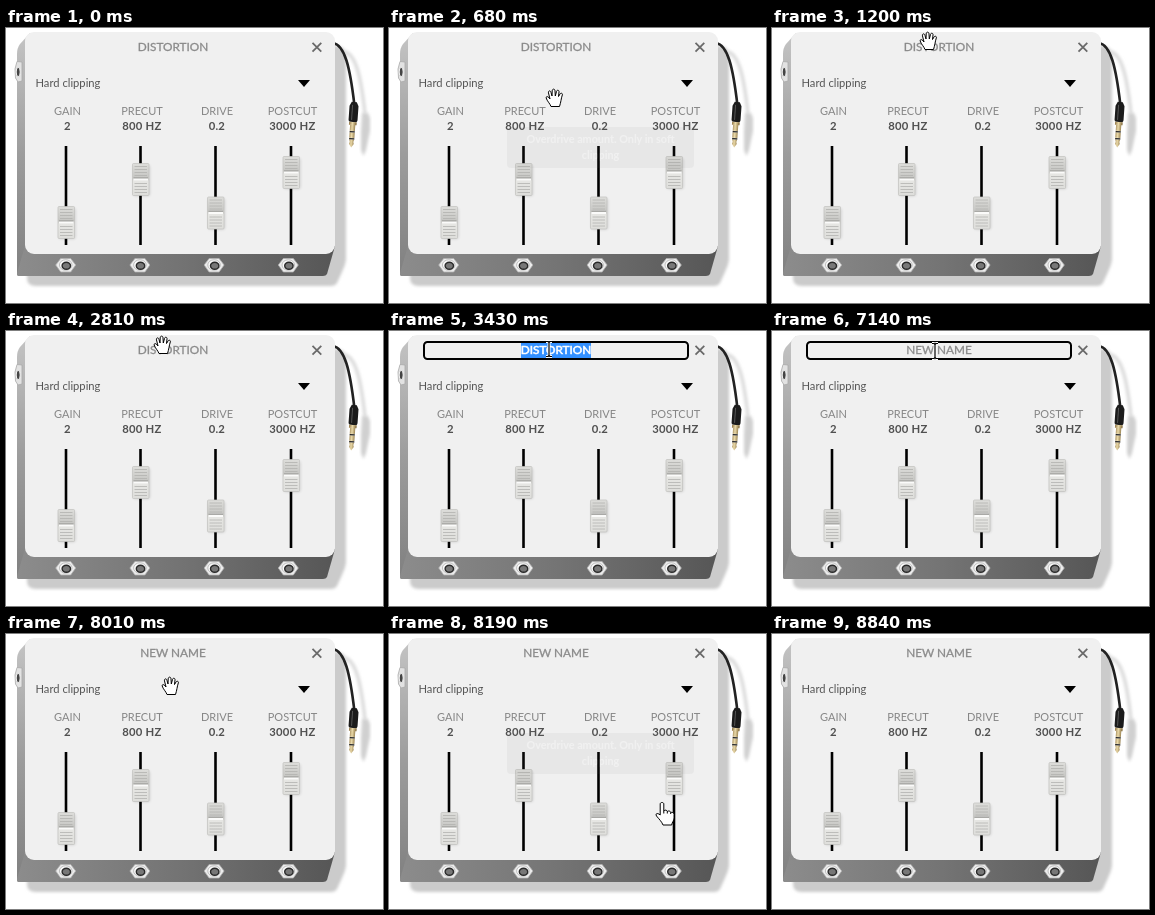
An HTML page that plays this animation: 377x275 px, repeating every 9.31 s.

```html
<!DOCTYPE html>
<html lang="en">
<head>
<meta charset="utf-8">
<title>Distortion pedal</title>
<style>
html, body { margin: 0; width: 100%; height: 100%; overflow: hidden; background: #fff; }
svg { display: block; width: 377px; height: 275px; }
text { font-family: Lato, "Open Sans", sans-serif; text-anchor: middle; white-space: pre; }
.label { font-size: 11px; fill: #868686; }
.value { font-size: 11.3px; font-weight: 700; letter-spacing: .25px; fill: #505050; }
.title { font-size: 11.8px; fill: #8a8a8a; stroke: #8a8a8a; stroke-width: .3; }
.selected { fill: #fff; stroke: #fff; stroke-width: .6; }
.mode { font-size: 11.2px; fill: #555; text-anchor: start; }
.tip text { font-size: 10.8px; font-weight: 700; fill: #fff; }
.cursor { fill: #fff; stroke: #000; stroke-linejoin: round; }
</style>
</head>
<body>
<svg id="stage" viewBox="0 0 377 275">
  <defs>
    <linearGradient id="left" x2="0" y2="1">
      <stop offset="0" stop-color="#c4c4c4"/><stop offset=".5" stop-color="#9c9c9c"/><stop offset="1" stop-color="#808080"/>
    </linearGradient>
    <linearGradient id="front">
      <stop offset="0" stop-color="#8c8c8c"/><stop offset=".5" stop-color="#747474"/><stop offset="1" stop-color="#565656"/>
    </linearGradient>
    <linearGradient id="thumbFill" x2="0" y2="1">
      <stop offset="0" stop-color="#dededb"/><stop offset=".45" stop-color="#c6c6c3"/>
      <stop offset=".55" stop-color="#e6e6e3"/><stop offset="1" stop-color="#dededb"/>
    </linearGradient>
    <linearGradient id="gold">
      <stop offset="0" stop-color="#8f7443"/><stop offset=".45" stop-color="#ead9a8"/><stop offset="1" stop-color="#7d6434"/>
    </linearGradient>
    <filter id="soft" x="-20%" y="-20%" width="140%" height="140%"><feGaussianBlur stdDeviation="1.6"/></filter>
    <g id="thumb">
      <rect x="-7" y="-14" width="16.5" height="31" rx="2" fill="#000" opacity=".14" filter="url(#soft)"/>
      <rect x="-8" y="-15.5" width="16.5" height="32" rx="1" fill="url(#thumbFill)" stroke="#c2c2bf" stroke-width=".7"/>
      <path d="M-6-12.5H6.5M-6-9.5H6.5M-6-6.5H6.5M-6-3.5H6.5M-6 4.5H6.5M-6 7.5H6.5M-6 10.5H6.5M-6 13.5H6.5" stroke="#b3b3b0" stroke-width=".8"/>
      <path d="M-7 .5H7.5" stroke="#fbfbfa" stroke-width="2"/>
      <path d="M-7-1.2H7.5" stroke="#a2a29f"/>
    </g>
    <g id="socket">
      <path d="M-10 0L-5-6.5H5L10 0L5 7H-5Z" fill="#ececec" stroke="#b0b0b0" stroke-width=".8"/>
      <ellipse rx="6.3" ry="5.2" fill="#fafafa" stroke="#aaa" stroke-width=".7"/>
      <ellipse cx=".6" cy=".7" rx="4.2" ry="3.5" fill="#777" stroke="#2a2a2a" stroke-width="1.4"/>
    </g>
    <g id="plug">
      <path d="M-2.5 74H2.5L4.5 78V92Q4.5 94 2.5 94H-2.5Q-4.5 94-4.5 92V78Z" fill="#1b1b1b"/>
      <path d="M-1.5 77V92" stroke="#555"/>
      <path d="M-3.8 94H3.8V97H-3.8ZM-2.6 97H2.6V103H-2.6ZM-2.6 104.5H2.6V110H-2.6ZM-2.6 111.5H2.6L1.8 114L2.4 116L0 119.5L-2.4 116L-1.8 114Z" fill="url(#gold)"/>
      <path d="M-2.6 103.8H2.6M-2.6 110.8H2.6" stroke="#222" stroke-width="1.3"/>
    </g>
  </defs>

  <rect width="377" height="275" fill="#fff"/>
  <path d="M34 18H330Q340 18 340 28V232Q339 238 336 244L331 255Q329 258 325 258H30Q21 258 21 250V30Z" fill="#cbcbcb" filter="url(#soft)"/>
  <path d="M339 24C350 27 355 49 359 86" fill="none" stroke="#dcdcdc" stroke-width="3.5" filter="url(#soft)"/>
  <path d="M356 85H362L364 90V103L360 122L357.5 128L355 122L355 103Z" fill="#d0d0d0" filter="url(#soft)"/>
  <path d="M327 15C339 17 344 40 348.3 76" fill="none" stroke="#222" stroke-width="2.6"/>
  <use href="#plug" transform="translate(348.3 0) rotate(4 0 74)"/>

  <path d="M24 5L14 16Q11 20 11 26V246Q11 248 13 248L28 224V5Z" fill="url(#left)"/>
  <path d="M19 218L11 245V246Q11 248 13 248H317Q320 248 321 246L329 218Z" fill="url(#front)"/>
  <path d="M16 34L11 33.5L9 41L9.5 50L12 54L16 53Z" fill="#e2e2e2" stroke="#aaa" stroke-width=".8"/>
  <ellipse cx="12.2" cy="44" rx="2" ry="4.6" fill="#444" stroke="#f5f5f5"/>
  <rect x="19" y="4" width="310" height="222" rx="9" fill="#f0f0f0"/>

  <path d="M306.5 14.8L315.3 23.6M315.3 14.8L306.5 23.6" stroke="#6a6a6a" stroke-width="1.8"/>
  <text class="mode" x="29.5" y="59">Hard clipping</text>
  <path d="M292 52H304L298 59Z"/>
  <g id="controls"></g>

  <g id="editor">
    <rect x="35" y="11" width="264" height="17" rx="3.5" fill="#f0f0f0" stroke="#000" stroke-width="2"/>
    <rect id="selection" x="132" y="12" width="70" height="15" fill="#3390ff"/>
  </g>
  <text id="title" class="title" x="167" y="23"></text>
  <g id="tip" class="tip">
    <rect x="118" y="99" width="187" height="41" rx="4" fill="#777"/>
    <text x="211.5" y="115">Overdrive amount. Only in soft</text>
    <text x="211.5" y="131">clipping</text>
  </g>

  <g id="cursor" class="cursor">
    <path data-kind="grab" d="M-4 8.5C-5 5.5-8 3-8.8 0C-9-2-7-2-5 1L-6.5-5C-7-7.5-4.5-8-4-5.5L-3-2L-2.8-7C-2.8-9.5 0-9.5 0-7L.3-2L1.5-6.5C2-8.5 4.3-8 4-6L3.5-1.5L5-4C6-5.5 8-4.5 7.3-3C6 1 6 4 4.5 8.5Z"/>
    <path data-kind="pointer" d="M-1.8 1C-1.8-1 1.8-1 1.8 1V8C3 6.5 5 7 5.3 8.5C6.5 7.5 8.5 8 8.7 9.5C10 9 12 9.5 12 11.5V15C12 18 10 19 9.7 22H1C0 19-3 16-5.5 13C-7 10.5-4.5 9.5-1.8 12ZM1.8 8V10.5M5.3 8.5V10.5M8.7 9.5V11"/>
    <path data-kind="arrow" d="M0 0V16L3.7 12.5L6.3 18L8.7 17L6.2 11.5H11.3Z"/>
    <g data-kind="text" fill="none">
      <path d="M-3-7.5H-1L0-6.5L1-7.5H3M0-6.5V6.5M-3 7.5H-1L0 6.5L1 7.5H3" stroke="#fff" stroke-width="3"/>
      <path d="M-3-7.5H-1L0-6.5L1-7.5H3M0-6.5V6.5M-3 7.5H-1L0 6.5L1 7.5H3" stroke-width="1.2"/>
    </g>
  </g>
</svg>
<script>
const LOOP = 9310;
const $ = id => document.getElementById(id);

const controls = [
  { label: "GAIN", value: "2", x: 60, thumb: 194 },
  { label: "PRECUT", value: "800 HZ", x: 134.5, thumb: 151 },
  { label: "DRIVE", value: "0.2", x: 209.5, thumb: 184.5 },
  { label: "POSTCUT", value: "3000 HZ", x: 285, thumb: 144 }
];

$("controls").innerHTML = controls.map(({ label, value, x, thumb }, i) => `
  <text class="label" x="${x + 1.5}" y="87">${label}</text>
  <text class="value" x="${x + 1.4}" y="102.4">${value}</text>
  <path d="M${x} 118V217" stroke="#000" stroke-width="2.6"/>
  <use href="#thumb" x="${x}" y="${thumb}"/>
  <use href="#socket" x="${59.7 + 74.2 * i}" y="237"/>`).join("");

// Tooltip fades: [enter, leave, faded out, peak opacity]
const hovers = [[300, 420, 800, .2], [8110, 8180, 8480, .065]];

// [time, x, y]
const path = [
  [90, 305, 280], [250, 278, 215], [420, 222, 150], [600, 172, 90], [780, 159, 45],
  [1010, 157, 26], [1040, 157, 25], [1200, 157, 13], [2790, 157, 13], [2840, 156, 15],
  [3180, 156, 15], [3200, 160, 18], [7120, 160, 18], [7140, 163, 20], [7410, 165, 51],
  [8010, 165, 51], [8100, 208, 104], [8190, 272.4, 168.4], [8350, 326, 280]
];

const typing = [
  [0, "DISTORTION"], [4460, "N"], [4520, "NE"], [4790, "NEW"], [5050, "NEW "],
  [5240, "NEW N"], [5430, "NEW NA"], [5820, "NEW NAM"], [6210, "NEW NAME"]
];

const clamp = v => Math.max(0, Math.min(1, v));

function position(t) {
  const i = path.findIndex(([time]) => time > t);
  if (i < 1) return null;
  const [t0, x0, y0] = path[i - 1], [t1, x1, y1] = path[i];
  const k = (t - t0) / (t1 - t0);
  return [x0 + (x1 - x0) * k, y0 + (y1 - y0) * k];
}

function cursorKind(t, y) {
  if (t >= 3180 && t < 7410 && y < 30) return "text";
  if (y > 248) return "arrow";
  return y > 75 && y < 226 ? "pointer" : "grab";
}

function hoverOpacity(t, [enter, leave, end, peak]) {
  return peak * (t < leave ? clamp((t - enter) / (leave - enter)) : clamp((end - t) / (end - leave)));
}

function render(t) {
  const editing = t >= 3180 && t < 7380;
  const selected = editing && t >= 3220 && t < 4460;
  $("editor").style.display = editing ? "" : "none";
  $("selection").style.display = selected ? "" : "none";
  $("title").textContent = typing.filter(([time]) => time <= t).pop()[1];
  $("title").classList.toggle("selected", selected);
  $("tip").style.opacity = Math.max(...hovers.map(h => hoverOpacity(t, h)));

  const at = position(t);
  $("cursor").style.display = at ? "" : "none";
  if (!at) return;
  $("cursor").setAttribute("transform", `translate(${at.map(Math.round)})`);
  const kind = cursorKind(t, at[1]);
  for (const shape of $("cursor").children) shape.style.display = shape.dataset.kind === kind ? "" : "none";
}

const start = performance.now();
function frame() {
  render((performance.now() - start) % LOOP);
  requestAnimationFrame(frame);
}
frame();
</script>
</body>
</html>
```
